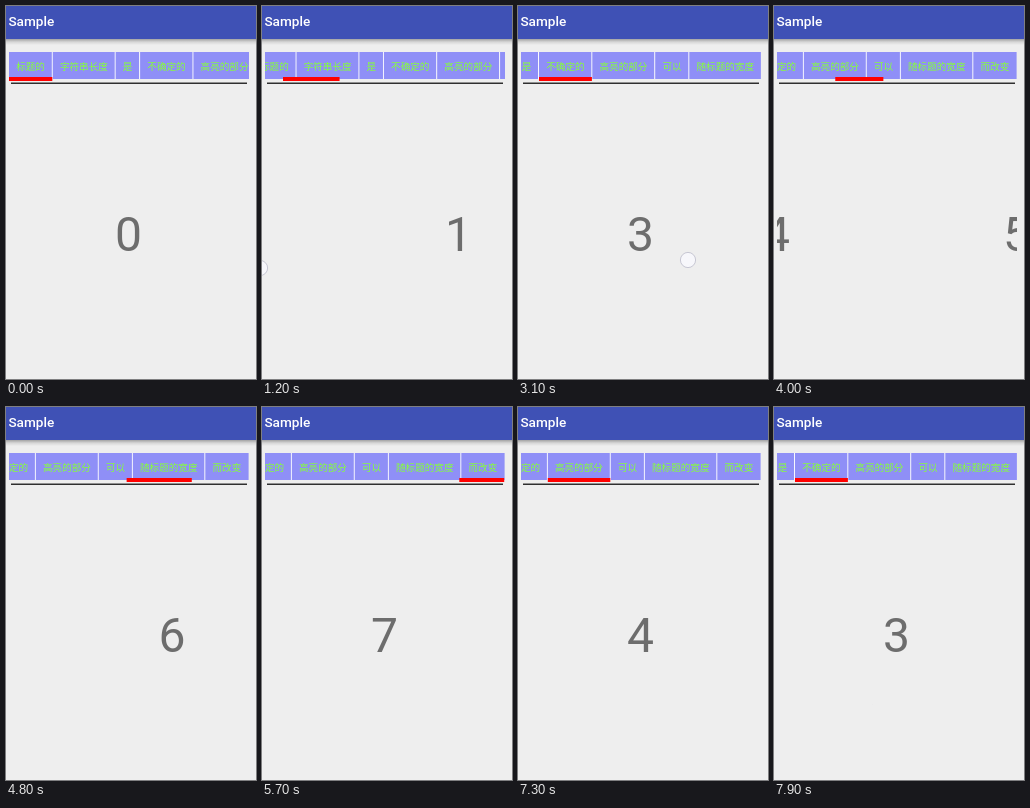
Write an HTML page that moves like this. It is 250 px wide and 373 px high and loops after 8 s.

```html
<!DOCTYPE html>
<html lang="zh">
<head>
<meta charset="utf-8">
<title>Sample</title>
<style>
  html, body { margin: 0; width: 100%; height: 100%; overflow: hidden; background: #eee; }
  svg { display: block; width: 250px; height: 373px; }
  .title { font: 500 13.6px Roboto, sans-serif; fill: #fff; }
  .tab { font: 9.6px "Noto Sans CJK SC", "Noto Sans CJK", "Noto Sans CJK JP", sans-serif; fill: #86ff3a; }
  .page { font: 48px Roboto, sans-serif; fill: #6d6d6d; text-anchor: middle; }
</style>
</head>
<body>
<svg viewBox="0 0 250 373" xmlns="http://www.w3.org/2000/svg">
  <defs>
    <linearGradient id="shade" x2="0" y2="1">
      <stop offset="0" stop-color="#000" stop-opacity=".32"/>
      <stop offset=".5" stop-color="#000" stop-opacity=".1"/>
      <stop offset="1" stop-color="#000" stop-opacity="0"/>
    </linearGradient>
    <clipPath id="frame"><rect x="3" y="40" width="240" height="333"/></clipPath>
  </defs>
  <rect width="250" height="373" fill="#eee"/>
  <rect y="33" width="250" height="6" fill="url(#shade)"/>
  <rect width="250" height="33" fill="#3f51b5"/>
  <text class="title" x="2.4" y="20">Sample</text>
  <g clip-path="url(#frame)">
    <g id="strip"></g>
    <rect id="bar" y="71" height="4" fill="#f00"/>
    <g id="pages"></g>
  </g>
  <rect x="5" y="76.6" width="236" height="1.2" fill="#000"/>
  <circle id="touch" r="7.6" fill="#fafaff" fill-opacity=".75" stroke="#bcbccb" stroke-width=".8"/>
</svg>
<script>
const LOOP = 8000, STEP = 100;
const LEFT = 3, PAGE = 240, CENTER = 122.5;
const CHAR = 9.6, PAD = 7.2, EXTRA = 14.9;
const LEAD = 18, MAX_SCROLL = 157.6;

const titles = ['标题的', '字符串长度', '是', '不确定的', '高亮的部分', '可以', '随标题的宽度', '而改变'];

// skew bends the easing; x, y is where the finger lands, lift is when it leaves
const swipes = [
  { from: 0, to: 1, start: 700, end: 1400, skew: 1.37, x: 170, y: 262, lift: .75 },
  { from: 1, to: 2, start: 1600, end: 2200, skew: 1.1, x: 180, y: 270, lift: .6 },
  { from: 2, to: 3, start: 2300, end: 2800, skew: 1.1, x: 180, y: 280, lift: .6 },
  { from: 3, to: 4, start: 3100, end: 3600, skew: 1, x: 170, y: 254, lift: .6 },
  { from: 4, to: 5, start: 3800, end: 4300, skew: .756, x: 180, y: 241, lift: .4 },
  { from: 5, to: 6, start: 4500, end: 4900, skew: 1.1, x: 180, y: 236, lift: .6 },
  { from: 6, to: 7, start: 5200, end: 5700, skew: 1.22, x: 195, y: 236, lift: .5 },
  { from: 7, to: 6, start: 6000, end: 6400, skew: 1, x: 25, y: 285, lift: .7 },
  { from: 6, to: 5, start: 6500, end: 6800, skew: 1, x: 30, y: 289, lift: .7 },
  { from: 5, to: 4, start: 6900, end: 7300, skew: 1, x: 38, y: 296, lift: .8 },
  { from: 4, to: 3, start: 7500, end: 7900, skew: 1, x: 38, y: 299, lift: .8 }
];

const $ = id => document.getElementById(id);
const lerp = (a, b, k) => a + (b - a) * k;

function add(parent, tag, attrs, text) {
  const el = document.createElementNS('http://www.w3.org/2000/svg', tag);
  set(el, attrs);
  if (text !== undefined) el.textContent = text;
  parent.appendChild(el);
  return el;
}

function set(el, attrs) {
  for (const key in attrs) el.setAttribute(key, attrs[key]);
}

const strip = $('strip'), bar = $('bar'), touch = $('touch');
const last = titles.length - 1;

let edge = 0;
const tabs = titles.map((title, i) => {
  const x = edge, width = title.length * CHAR + EXTRA;
  edge += width;
  add(strip, 'rect', { x, y: 46, width: width - .4, height: 27, fill: '#8f8ff7' });
  if (i < last) add(strip, 'rect', { x: edge - .9, y: 46, width: 1.4, height: 27, fill: '#fff' });
  add(strip, 'text', { class: 'tab', x: x + PAD, y: 63.6 }, title);
  // the bar overhangs the last tab slightly
  return { x, width, barX: i === last ? x - 2 : x, barEnd: edge - (i === last ? .8 : .4) };
});
const pages = titles.map((_, i) => add($('pages'), 'text', { class: 'page', y: 244.5 }, i));

function ease(p, skew) {
  const q = Math.pow(p, skew);
  return q * q * (3 - 2 * q);
}

function draw(time) {
  const t = Math.floor(time % LOOP / STEP) * STEP;
  const swipe = swipes.filter(s => s.start <= t).pop();
  let pos = 0, finger = false;

  if (swipe) {
    const { from, to, start, end, skew, x, y, lift } = swipe;
    const p = Math.min(1, (t - start) / (end - start));
    const moved = ease(p, skew), dir = to - from;
    pos = lerp(from, to, moved);
    finger = p < lift;
    set(touch, { cx: x - dir * (PAGE * moved + (p ? 6 : 0)), cy: y });
  }
  touch.style.display = finger ? '' : 'none';

  const i = Math.floor(pos), k = pos - i;
  const tab = tabs[i], next = tabs[Math.min(i + 1, last)];
  const scroll = Math.max(0, Math.min(MAX_SCROLL, tab.x + k * tab.width - LEAD));
  const shift = LEFT - scroll;
  const x = lerp(tab.barX, next.barX, k), end = lerp(tab.barEnd, next.barEnd, k);

  set(strip, { transform: `translate(${shift} 0)` });
  set(bar, { x: x + shift, width: end - x });
  pages.forEach((page, n) => set(page, { x: CENTER + (n - pos) * PAGE }));
}

let origin;
function tick(now) {
  if (origin === undefined) origin = now;
  draw(now - origin);
  requestAnimationFrame(tick);
}
draw(0);
requestAnimationFrame(tick);
</script>
</body>
</html>
```
